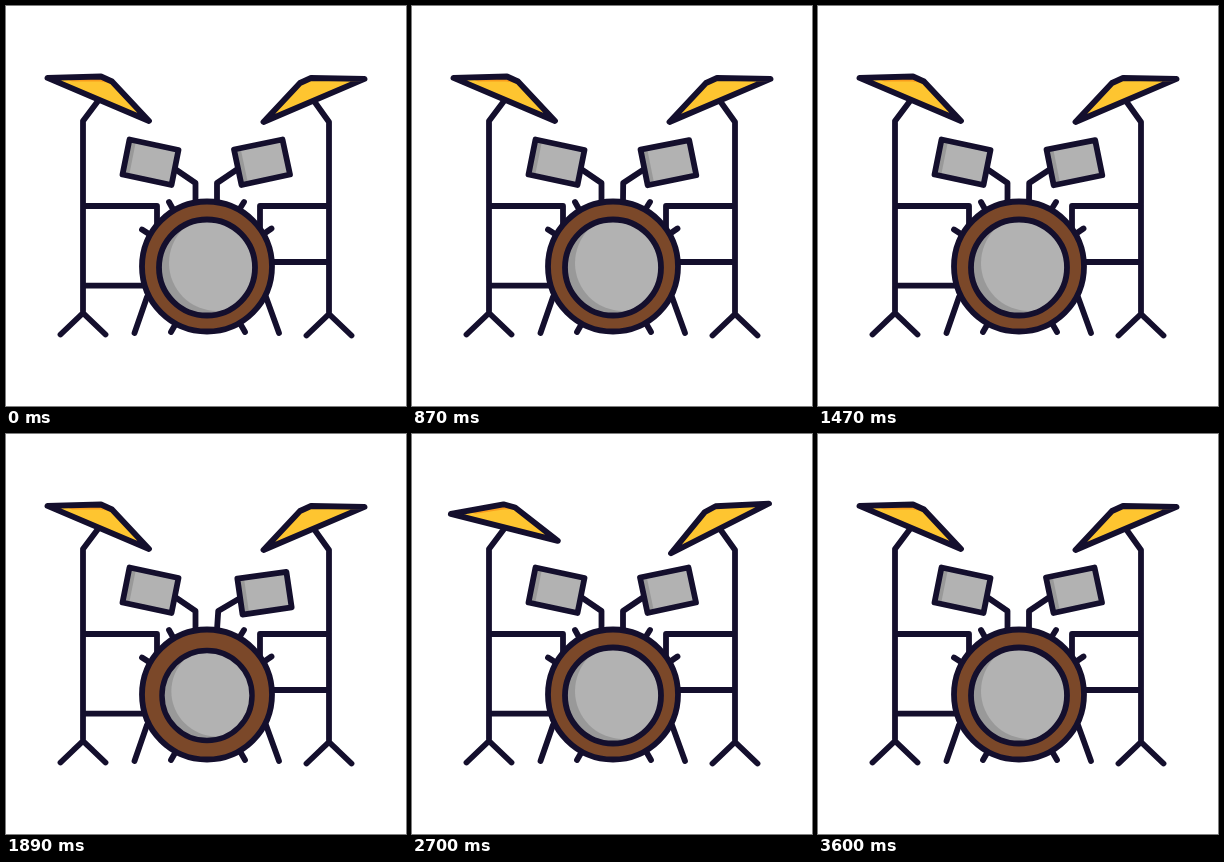
Animation of 400 by 400 pixels, one loop 5630 ms. Source, as an HTML page:

```html
<!DOCTYPE html>
<html lang="en">
<head>
<meta charset="utf-8">
<title>Drum kit</title>
<style>
  html, body { margin: 0; width: 100%; height: 100%; overflow: hidden; background: #fff; }
  svg { display: block; width: 100%; height: 100%; }
  .line { fill: none; stroke: #140f2d; stroke-width: 5.8; stroke-linecap: round; stroke-linejoin: round; }
  .skin { fill: #b2b2b2; }
  .shade { fill: #999; }
  .brass { fill: #fec530; }
  .glow { fill: #f99d1c; }
  .wood { fill: #7b4829; }
</style>
</head>
<body>
<svg viewBox="0 0 400 400">
  <defs>
    <clipPath id="head"><circle cx="201" cy="261.5" r="48"/></clipPath>
  </defs>

  <!-- stands -->
  <path class="line" d="M92 95 77 115V307M54.5 328.5 77 307 99.5 328.5
    M77 200H151V222M77 279.7H137"/>
  <path class="line" d="M308 95 323 116V308M300.5 329.5 323 308 345.5 329.5
    M323 200H254V222M323 256H268"/>

  <g id="tomL">
    <path class="line" d="M169 163 189.5 177V194"/>
    <path class="skin" d="M123.5 133.5 172.5 144 165.5 179 116.5 168.5Z"/>
    <path class="shade" d="M123.5 133.5 130 135 123 170 116.5 168.5Z"/>
    <path class="line" d="M123.5 133.5 172.5 144 165.5 179 116.5 168.5Z"/>
  </g>
  <g id="tomR">
    <path class="line" d="M231 163.500 211 177V194"/>
    <path class="skin" d="M228 143.500 276.500 133.500 284 168.500 235.500 179Z"/>
    <path class="shade" d="M228 143.500 234.500 142 242 177.500 235.500 179Z"/>
    <path class="line" d="M228 143.500 276.500 133.500 284 168.500 235.500 179Z"/>
  </g>

  <!-- bass drum -->
  <path class="line" d="M141 291 128.500 327M260 291 273 327
    M163 196 168 205M238 196 233 204M136 223.500 143 228M265.500 222.500 259 227
    M165 326 169 319M239 326 235 319"/>
  <circle class="wood" cx="201" cy="260.500" r="65"/>
  <circle class="line" cx="201" cy="260.500" r="65"/>
  <g id="bass">
    <circle class="shade" cx="201" cy="261.500" r="48"/>
    <circle class="skin" cx="211" cy="257" r="48" clip-path="url(#head)"/>
    <circle class="line" cx="201" cy="261.500" r="48"/>
  </g>

  <g id="cymL">
    <path class="brass" d="M41.500 71.800 95 70.500 106 75.500 143 115Z"/>
    <path class="glow" d="M58 72 95 71 104 77 94 75.500 66 75.500Z"/>
    <path class="line" d="M41.500 71.800 95 70.500 106 75.500 143 115Z"/>
  </g>
  <g id="cymR">
    <path class="brass" d="M358.500 72.800 305 72 294 77 257.500 116Z"/>
    <path class="line" d="M358.500 72.800 305 72 294 77 257.500 116Z"/>
  </g>
</svg>
<script>
  const LOOP = 5630, STEP = 30, END = 3600, SWING = 360, DECAY = 0.0045;
  const el = id => document.getElementById(id);
  const turn = (id, deg, x, y) =>
    el(id).setAttribute('transform', `rotate(${deg.toFixed(3)} ${x} ${y})`);

  // Damped swing whose first peak is about `peak` degrees.
  function ring(t, start, peak) {
    const u = t - start;
    if (u <= 0 || t >= END) return 0;
    const fade = Math.exp(-DECAY * (u - SWING / 4));
    return peak * fade * Math.sin(2 * Math.PI * u / SWING);
  }

  // Kick pulse: 0 at rest, 1 at the hit.
  function kick(t) {
    if (t < 540 || t > 3240) return 0;
    const off = Math.abs((t - 690 + 300) % 600 - 300);
    return off < 150 ? 0.5 + 0.5 * Math.cos(Math.PI * off / 150) : 0;
  }

  function draw(now) {
    const t = Math.min(END, Math.floor(now % LOOP / STEP) * STEP);
    const lean = t >= STEP && t < 1800 ? 0.6 : 0;
    turn('tomL', ring(t, 150, -5.6), 189, 196);
    turn('tomR', lean + ring(t, 1800, 3.7), 211, 196);
    turn('cymL', ring(t, 2430, 20), 92, 93);
    turn('cymR', ring(t, 2250, -19), 308, 94);
    const s = 1 - 0.062 * kick(t);
    el('bass').setAttribute('transform',
      `translate(201 261.5) scale(${s.toFixed(4)}) translate(-201 -261.5)`);
  }

  const begin = performance.now();
  function frame() {
    draw(performance.now() - begin);
    requestAnimationFrame(frame);
  }
  draw(0);
  requestAnimationFrame(frame);
</script>
</body>
</html>
```
